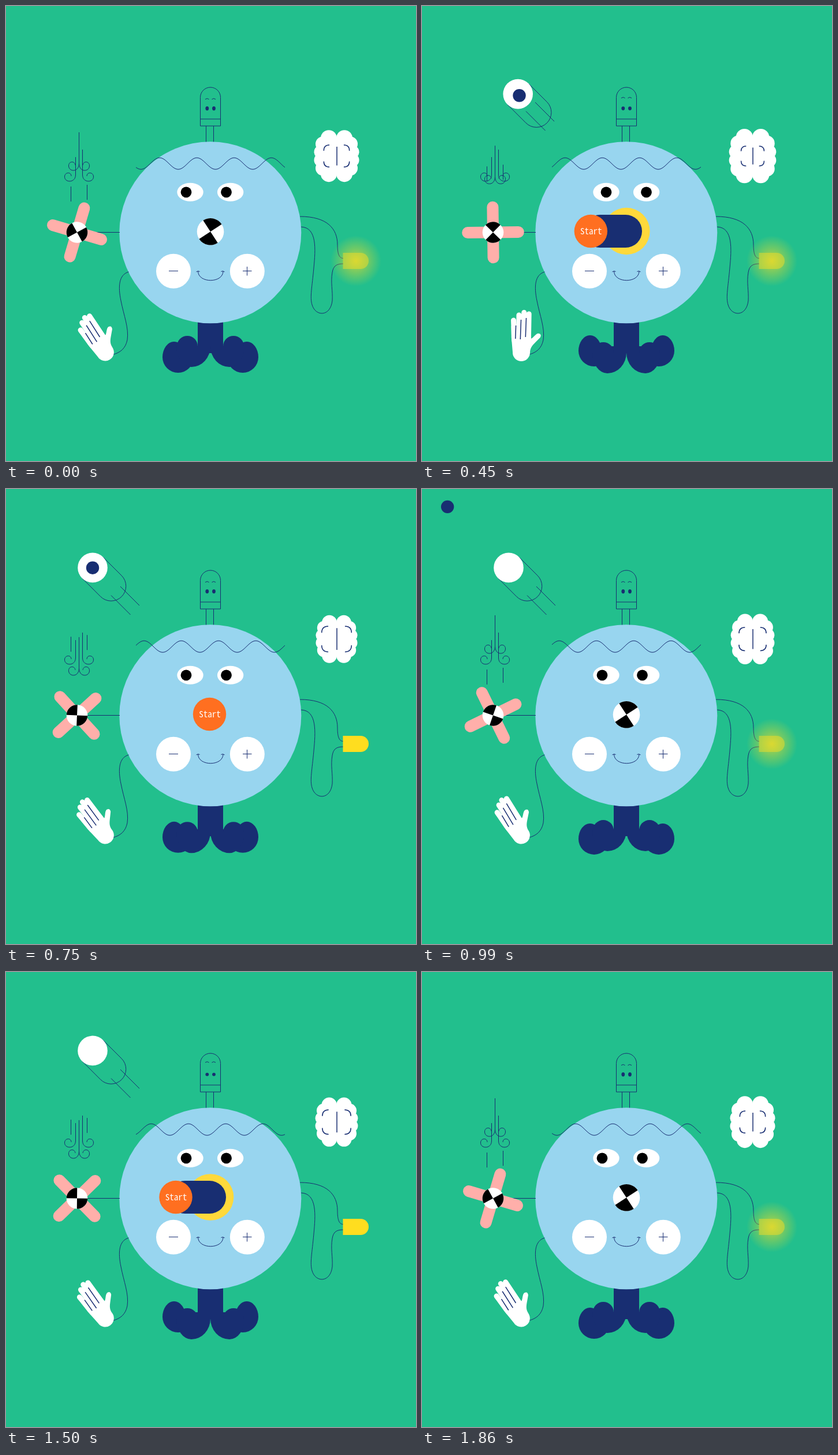
Animation, 710 px wide and 789 px high, one loop 1890 ms. Source, as an HTML page:

```html
<!DOCTYPE html>
<html>
<head>
<meta charset="utf-8">
<style>
html, body { margin: 0; width: 100%; height: 100%; overflow: hidden; background: #22bf8d; }
svg { display: block; width: 710px; height: 789px; }
.line { fill: none; stroke: #182e72; stroke-width: 1; }
.mark { fill: none; stroke: #182e72; stroke-width: 1.5; }
.navy { fill: #182e72; }
.white { fill: #fff; }
text { font: 15px "Noto Sans Mono CJK JP", "Noto Sans Mono CJK SC", "Noto Sans Mono", monospace; fill: #fff; text-anchor: middle; }
</style>
</head>
<body>
<svg viewBox="0 0 710 789">
  <defs>
    <g id="disc">
      <circle r="1" fill="#fff"/>
      <path d="M0 0V-1A1 1 0 0 1 1 0ZM0 0V1A1 1 0 0 1 -1 0Z"/>
    </g>
    <g id="lobes">
      <circle cx="-13.5" cy="-31" r="14"/><circle cx="-23.5" cy="-21" r="13"/>
      <circle cx="-27" cy="-7" r="12"/><circle cx="-27" cy="7" r="12"/>
      <circle cx="-23.5" cy="21" r="13"/><circle cx="-13.5" cy="31" r="14"/>
      <path d="M-24 -30H.5V30H-24Z"/>
    </g>
    <g id="foot" class="navy">
      <path d="M318 590H354V602H318Z"/>
      <path id="heel" d="M271 603.5A20 27 0 0 1 311 603.5H325A27 27 0 0 1 271 603.5Z"/>
      <g id="toe">
        <circle cx="314" cy="595.5" r="18"/>
        <path d="M354 595.5A33 36 0 0 1 321 631.5A26 36 0 0 1 295 595.5Z"/>
      </g>
    </g>
    <radialGradient id="glow">
      <stop offset="0" stop-color="#ffdd1f" stop-opacity=".7"/>
      <stop offset=".5" stop-color="#ffdd1f" stop-opacity=".34"/>
      <stop offset="1" stop-color="#ffdd1f" stop-opacity="0"/>
    </radialGradient>
  </defs>

  <!-- legs and head -->
  <path class="navy" d="M332 540H376V602H332Z"/>
  <use href="#foot"/>
  <use href="#foot" transform="matrix(-1 0 0 1 708 0)"/>
  <path class="line" d="M346.5 208V237M359.5 208V237"/>
  <circle cx="353.8" cy="392.7" r="157.5" fill="#98d5ef"/>
  <path id="hair" class="line"/>

  <!-- lamp on top -->
  <path class="line" d="M336.5 208V158.5A17.5 17.5 0 0 1 371.5 158.5V208ZM336.5 196H371.5"/>
  <path id="brows" class="line" d="M345 1.3Q348.3 -1.5 351.5 1.3M356.5 1.3Q359.7 -1.5 363 1.3"/>
  <ellipse class="navy blink" cx="348.3" cy="177.6" rx="2.9"/>
  <ellipse class="navy blink" cx="360" cy="177.6" rx="2.9"/>

  <!-- face -->
  <g class="white">
    <ellipse cx="319" cy="322.8" rx="22.7" ry="16"/><ellipse cx="388.6" cy="322.8" rx="22.7" ry="16"/>
    <circle cx="290" cy="459.7" r="30"/><circle cx="417.8" cy="459.7" r="30"/>
  </g>
  <g id="pupils"><circle cx="312" cy="322.8" r="9.4"/><circle cx="381.5" cy="322.8" r="9.4"/></g>
  <path class="line" d="M282 459.5H298M410 459.5H425.5M417.5 452V467.5M332.5 460C333 481 375.5 481 376 460M329.5 461Q332.5 458.5 335.5 460.5M372.5 460.5Q375.5 458.5 378.5 461"/>

  <!-- nose and switch -->
  <use id="nose" href="#disc" transform="translate(354 391.3) rotate(-33) scale(23.3)"/>
  <circle id="ring" cx="354" cy="390.5" fill="#ffd93b"/>
  <path id="slot" fill="none" stroke="#182e72" stroke-width="57" stroke-linecap="round"/>
  <g id="button"><circle r="28.7" fill="#ff6f20"/><text x=".5" y="5.8">Start</text></g>

  <!-- fan -->
  <path class="line" d="M123 392.5H197"/>
  <g id="fan">
    <path d="M0 -43.8V43.8M-43.8 0H43.8" stroke="#ffafaa" stroke-width="20" stroke-linecap="round"/>
    <use href="#disc" transform="rotate(45) scale(18.3)"/>
  </g>

  <!-- wind -->
  <path class="line" d="M120.5 262V293C120.5 307 101.5 307 101.5 296C101.5 288 113 287 113 295M132.5 249V293C132.5 307 151.5 307 151.5 296C151.5 288 140 287 140 295"/>
  <path id="gust" class="line" d="M126.5 257V311C126.5 327 108.5 326 108.5 315C108.5 307 119 306 120 314M126.5 311C126.5 327 144.5 326 144.5 315C144.5 307 134 306 133 314"/>
  <path id="drops" class="line" d="M112.5 0V26M140.5 -3V23"/>

  <!-- hand -->
  <path class="line" d="M212.5 461C195 466 194 487 199 511C204 537 213 558 210 579C207 594 198 601 185 604.5"/>
  <g id="hand">
    <path class="white" d="M155 574L157 600A15 15 0 0 0 187 602C187 593 191 589 197 583L205 575Q208 569 202 568C197 568 193 576 189 577V555H155Z"/>
    <path d="M159 545L160 580M168.5 536L168 580M177.3 531.5L176.5 580M185.7 534L184.5 580" stroke="#fff" stroke-width="9" stroke-linecap="round"/>
    <path class="mark" d="M163 554L162 577M172 544L170.500 578M181 541L179.500 574"/>
  </g>

  <!-- bulb -->
  <path class="line" d="M509 365C556 365 574 386 574 414C574 430 577 437.5 584 437.5M511 383C539 384 536 422 533 454C530 488 526 505 530 518C536 539 562 539 565 511C566 493 562 480 565 462C567 450 573 447 584 447"/>
  <path id="bulb" fill="#ffdd1f" d="M583.5 428H614A14 14 0 0 1 614 456H583.5Z"/>
  <circle id="halo" cx="606" cy="442" r="44" fill="url(#glow)"/>

  <!-- brain -->
  <g transform="translate(572.5 260.2)">
    <g id="brain" class="white"><use href="#lobes"/><use href="#lobes" transform="scale(-1 1)"/></g>
    <path id="folds" class="mark"/>
  </g>

  <!-- flying eye -->
  <g id="eye">
    <g id="ball">
      <path class="line" d="M18.2 -18.2L50.2 13.8A25.7 25.7 0 0 1 13.8 50.2L-18.2 18.2"/>
      <circle class="white" r="25.8"/>
    </g>
    <path id="rays" class="line" d="M198 169L231 202M182 184.5L215.5 218"/>
  </g>
  <circle id="iris" class="navy" r="11.2"/>
</svg>
<script>
const LOOP = 1890, SPAN = 1860, STEP = 30, TAU = 2 * Math.PI;
const $ = id => document.getElementById(id);
const set = (id, name, value) => $(id).setAttribute(name, value);
const move = (id, x, y, more = '') => set(id, 'transform', `translate(${x} ${y}) ${more}`);
const show = (id, on) => set(id, 'visibility', on ? 'visible' : 'hidden');
const clamp = x => Math.max(0, Math.min(1, x));

// Smooth step from 0 to 1 while t goes from a to b
const ramp = (t, a, b) => {
  const x = clamp((t - a) / (b - a));
  return x * x * (3 - 2 * x);
};

// Soft pulse around a point of a cycle, wrapping at its ends
const pulse = (u, at, width) => {
  const d = u - at - Math.round(u - at);
  return Math.exp(-((d / width) ** 2));
};

function drawHair(t) {
  const crest = 266 - 28.5 * Math.sin(Math.PI * t / SPAN) ** 1.2;
  let d = '';
  for (let x = 225; x <= 483; x += 2) {
    const y = 273.2 - 10 * Math.cos((x - crest) / 64.5 * TAU);
    d += (d ? 'L' : 'M') + x + ' ' + y.toFixed(2);
  }
  set('hair', 'd', d);
}

function drawBrain(u) {
  const c = Math.cos(TAU * u);
  const swell = c ** 6 * (8 - 2 * c);
  set('brain', 'transform', `scale(${(72 + swell) / 78})`);
  const b = 25.8 - 0.6 * swell, h = b * 0.86, r = b * 0.44, mid = b * 0.73;
  let d = `M.5 ${-mid}V${mid}`;
  for (const sx of [-1, 1]) for (const sy of [-1, 1])
    d += `M${sx * b} ${sy * (h - r)}Q${sx * b} ${sy * h} ${sx * (b - r)} ${sy * h}`;
  set('folds', 'd', d);
}

function drawSwitch(u) {
  const open = ramp(u, .22, .285) - ramp(u, .63, .79) + 0.03 * pulse(u, .47, .06);
  const size = ramp(u, .195, .23) - ramp(u, .83, .93);
  const x = 352.5 - 58.5 * open;
  move('button', x, 390.5, `scale(${size})`);
  set('slot', 'd', `M${x + 16 * clamp(open)} 390.5H352.5`);
  set('ring', 'r', 28 + 12.3 * open);
  show('slot', open > 0.01);
  show('ring', open > 0.01);
  show('nose', size < 0.9);
}

function drawEye(t) {
  const slide = 42 * (1 - ramp(t, 300, 560));
  const size = ramp(t, 300, 400) - ramp(t, 1650, 1770);
  set('eye', 'transform', `translate(199 185) scale(${size}) translate(-199 -185)`);
  move('ball', 150 + slide, 136.4 + slide);
  move('rays', -slide * 0.12, -slide * 0.12);
  // the iris shoots off through the corner of the stage
  const shot = clamp((t - 780) / 270) ** 2;
  const at = slide + 2.5 * (1 - ramp(t, 430, 560)) - 175 * shot;
  move('iris', 150 + at, 136.7 + at, `scale(${size})`);
  show('iris', shot < 1);
}

function draw(t) {
  const u = t * 2 / SPAN % 1, swing = Math.sin(TAU * u);
  drawHair(t);
  drawBrain(u);
  drawSwitch(u);
  drawEye(t);

  move('fan', 123, 392.5, `rotate(${16.5 + 900 * u - 27 * swing})`);

  const gust = 38 * (ramp(u, .3, .62) - ramp(u, .8, 1));
  move('gust', 0, gust - 38);
  move('drops', 0, 313 - gust * 1.5);

  const tap = 11 * (ramp(u, .02, .18) - ramp(u, .65, .95)) - 5.5;
  move('heel', 0, -tap);
  move('toe', 0, tap);

  const glance = pulse(u, .47, .06);
  move('pupils', 7 * clamp(glance * 1.1), 0);
  set('hand', 'transform', `rotate(${4 * swing - 35 + 36 * glance} 171 601)`);

  const light = clamp(2 * (pulse(u, 0, .11) + pulse(u, .41, .11)) - 0.08);
  set('bulb', 'opacity', 1 - light * 0.55);
  set('halo', 'opacity', light);

  const lift = 5.4 * pulse(u, .58, .1);
  move('brows', 0, 160.5 - lift);
  for (const e of document.querySelectorAll('.blink')) e.setAttribute('ry', 3.6 - lift * 0.14);
}

function tick(now) {
  draw(Math.floor(now % LOOP / STEP) * STEP);
  requestAnimationFrame(tick);
}
draw(0);
requestAnimationFrame(tick);
</script>
</body>
</html>
```
